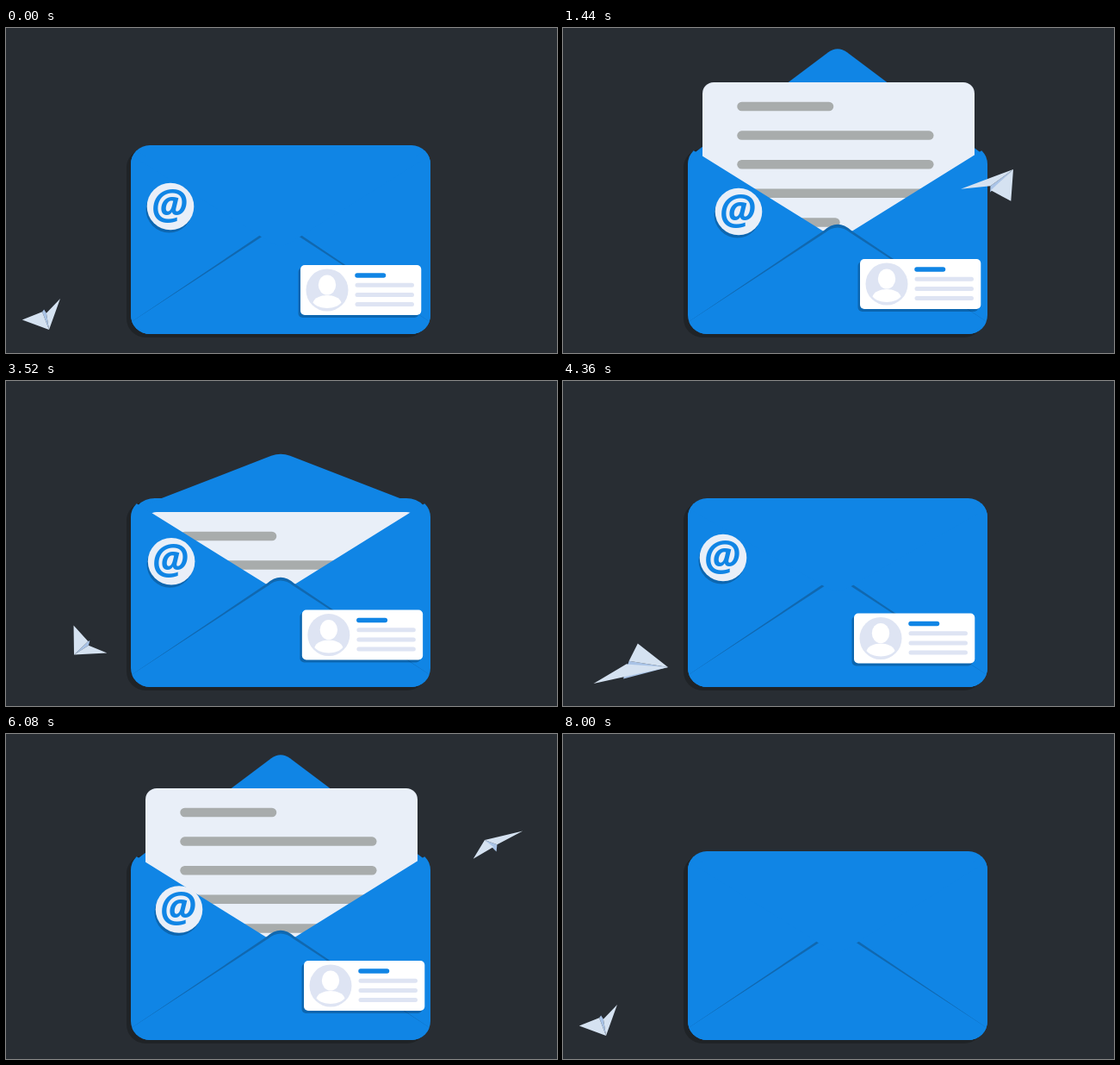
An HTML page that plays this animation: 640x377 px, repeating every 8.04 s.

```html
<!DOCTYPE html>
<html lang="en">
<head>
<meta charset="utf-8">
<title>Envelope and paper plane</title>
<style>
  html, body { margin: 0; width: 100%; height: 100%; overflow: hidden; background: #282d33; }
  svg { display: block; width: 100vw; height: 100vh; }
  .blue { fill: #1085e5; }
  .paper { fill: #e9eff8; }
  .shade { fill: #000; opacity: .23; }
  .fold { fill: #1068b0; }
  .wing { fill: #d5e2f1; }
  .keel { fill: #a9c3e6; }
  .pale { fill: #dee4f3; }
  .white { fill: #fff; }
  .bars path { stroke: #a8acac; stroke-width: 10.5; stroke-linecap: round; }
  .info { fill: none; stroke: #dee4f3; stroke-width: 5; stroke-linecap: round; }
  .info .title { stroke: #1085e5; stroke-width: 5.5; }
  text { font: italic bold 48px "Open Sans", "Noto Sans", sans-serif; text-anchor: middle; }
</style>
</head>
<body>
<svg viewBox="0 0 640 377" preserveAspectRatio="none">
  <defs>
    <clipPath id="body"><rect x="145" y="136" width="348" height="219" rx="22"/></clipPath>
  </defs>
  <g id="behind"></g>
  <rect x="140" y="140" width="348" height="219" rx="22" fill="#1f2327"/>
  <rect id="back" class="blue" x="145" y="136" width="348" height="219"/>
  <path id="flapBack" class="blue"/>
  <g id="letter">
    <rect class="paper" x="162" width="316" height="185" rx="13"/>
    <g id="bars" class="bars"></g>
  </g>
  <g clip-path="url(#body)">
    <path class="blue" d="M145 138L302 235.500H336L493 138V355H145Z"/>
    <path class="fold" d="M147 340L303 235Q319 220.500 335 235L491 340Z"/>
    <path class="blue" d="M147 340L304 237.700Q319 225.500 334 237.700L491 340L493 355H145Z"/>
  </g>
  <path id="flapFront" class="blue"/>
  <g id="badge">
    <circle class="shade" cx="-1.500" cy="3.500" r="27"/>
    <circle class="paper" r="27.300"/>
    <text class="blue" x="-1.500" y="14.500">@</text>
  </g>
  <g id="card">
    <rect class="shade" x="-2.500" y="3" width="140" height="58" rx="5"/>
    <rect class="white" width="140.300" height="58" rx="5"/>
    <circle class="pale" cx="31" cy="29" r="24.500"/>
    <ellipse class="white" cx="31" cy="23" rx="10.200" ry="11.500"/>
    <path class="white" d="M14.500 43.500C18 32 44 32 47.500 43.500C41 52 21 52 14.500 43.500Z"/>
    <g class="info">
      <path class="title" d="M66 12H96.500"/>
      <path d="M66 23.200H129.500M66 34.400H129.500M66 45.400H129.500"/>
    </g>
  </g>
  <g id="front">
    <g id="plane">
      <path id="keel" class="keel"/>
      <path id="wings" class="wing"/>
    </g>
  </g>
</svg>
<script>
  const LOOP = 8040, CYCLE = 4000;
  const $ = id => document.getElementById(id);
  const mix = (a, b, u) => a + (b - a) * u;
  const span = (t, from, to) => Math.min(1, Math.max(0, (t - from) / (to - from)));
  const sine = u => (1 - Math.cos(Math.PI * u)) / 2;
  const cubic = u => u < .5 ? 4 * u ** 3 : 1 - 4 * (1 - u) ** 3;

  // Smooth periodic curve through keys of [time, value...]; turn[c] is gained by column c each period.
  function curve(keys, turn) {
    const n = keys.length;
    const key = (i, c) => {
      const k = Math.floor(i / n);
      return keys[i - k * n][c] + k * (turn[c] || 0);
    };
    const slope = (i, c) => (key(i + 1, c) - key(i - 1, c)) / (key(i + 1, 0) - key(i - 1, 0));
    return t => {
      const i = keys.findLastIndex(k => k[0] <= t);
      const h = key(i + 1, 0) - key(i, 0), u = (t - key(i, 0)) / h, v = 1 - u;
      return keys[0].map((_, c) =>
        key(i, c) * v * v * (1 + 2 * u) + slope(i, c) * h * u * v * v
        + key(i + 1, c) * u * u * (3 - 2 * u) - slope(i + 1, c) * h * u * u * v);
    };
  }

  // time, badge centre, card corner
  const drift = curve([
    [0, 191, 207, 342, 275], [1440, 204, 213, 345, 268], [2920, 198, 212, 348, 263],
    [4360, 186, 205, 338, 269.5], [6080, 201, 203.5, 346, 263], [6960, 202, 196, 342, 266]
  ], [2 * CYCLE]);

  // time, nose, heading, sweep of the left and right wing, keel drop
  const flight = curve([
    [0, 50, 350, 69, 29, 22, -3], [360, 122, 332, 4, 37, 85, 17],
    [1440, 523, 164, -43, 60, 27, 1], [2080, 556, 123, -160, -5, 38, -8],
    [2520, 487, 138, -190, 25, 30, 0], [3400, 108, 302, -213, 29, 25, 0]
  ], [CYCLE, 0, 0, -360]);

  const triangle = (...points) => `M${points.join("L")}Z`;

  function drawPlane(t) {
    const [, x, y, heading, left, right, drop] = flight(t);
    const half = 25, root = .375 * (left + right);
    const N = "0 0", A = [-root, -4], B = [-root - 3, 0], K = [-root - 5, drop];
    $("keel").setAttribute("d", triangle(N, A, K) + triangle(N, B, K));
    $("wings").setAttribute("d", triangle(N, [-left, -half], A) + triangle(N, [-right, half], B));
    $("plane").setAttribute("transform", `translate(${x} ${y}) rotate(${heading})`);
    const home = $(t > 2250 && t < 3950 ? "behind" : "front");
    if ($("plane").parentNode !== home) home.append($("plane"));
  }

  function drawFlap(t) {
    const open = sine(span(t, 287, 867)) - sine(span(t, 3290, 3958));
    const base = 149, tip = mix(256, 20, open);
    const shoulder = mix(tip, base, 11 / 172);
    const d = `M147 ${base}L308 ${shoulder}Q319 ${tip} 330 ${shoulder}L491 ${base}Z`;
    $("flapBack").setAttribute("d", tip < base ? d : "");
    $("flapFront").setAttribute("d", tip < base ? "" : d);
    $("back").setAttribute("rx", mix(22, 30, open));
  }

  const bars = Array.from({ length: 5 }, () =>
    $("bars").appendChild(document.createElementNS("http://www.w3.org/2000/svg", "path")));

  function drawLetter(t) {
    const up = cubic(span(t, 640, 1320)) - cubic(span(t, 2855, 3475));
    place("letter", 0, mix(152, 63, up));
    bars.forEach((bar, i) => {
      const start = 665 + 155 * i, grown = sine(span(t, start, start + 310));
      const y = 28 + 33.6 * i, end = i ? 425.3 : 309;
      bar.setAttribute("d", grown ? `M207.500 ${y}H${mix(207.5, end, grown)}` : "");
    });
  }

  function place(id, x, y) {
    $(id).setAttribute("transform", `translate(${x} ${y})`);
  }

  function draw(now) {
    const t = now % LOOP, ended = t >= 2 * CYCLE;
    const phase = ended ? 0 : t % CYCLE;
    drawFlap(phase);
    drawLetter(phase);
    drawPlane(phase);
    const [, badgeX, badgeY, cardX, cardY] = drift(ended ? 0 : t);
    place("badge", badgeX, badgeY);
    place("card", cardX, cardY);
    $("badge").style.display = $("card").style.display = ended ? "none" : "";
  }

  let began;
  function tick(now) {
    began ??= now;
    draw(now - began);
    requestAnimationFrame(tick);
  }
  draw(0);
  requestAnimationFrame(tick);
</script>
</body>
</html>
```
